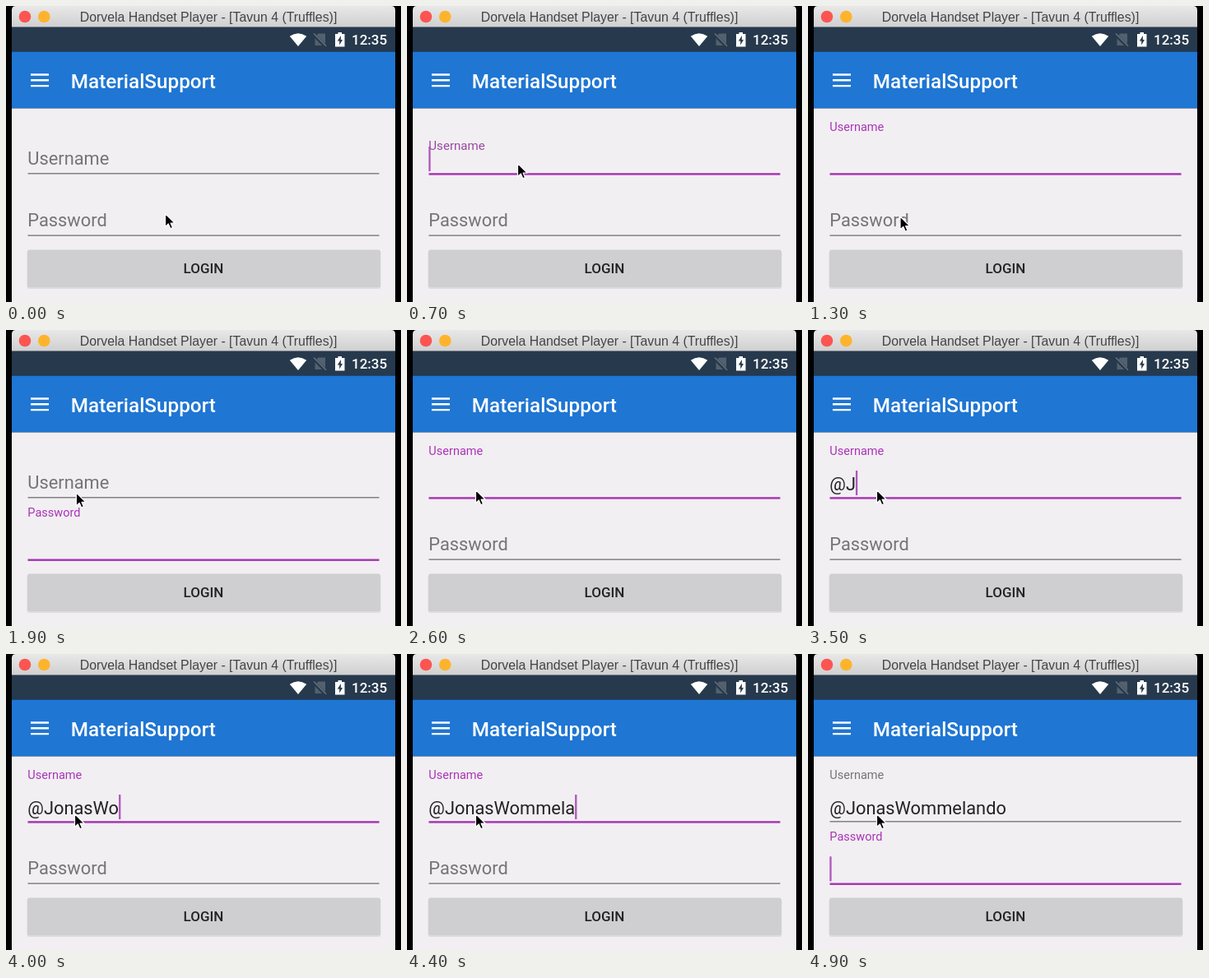
Animation, 480 px wide and 360 px high, one loop 5100 ms. Source, as an HTML page:

```html
<!DOCTYPE html>
<html lang="en">
<head>
<meta charset="utf-8">
<title>Floating labels</title>
<style>
  html, body { margin: 0; width: 100%; height: 100%; overflow: hidden; background: #000; }
  svg { display: block; width: 480px; height: 360px; }
  text { font-family: Roboto, sans-serif; white-space: pre; }
  .medium { font-weight: 500; }
  .bar { font: 15.85px "Liberation Sans", Arial, sans-serif; fill: #444; }
  .value { font-size: 21.84px; fill: #232225; }
  .caret { fill: #b155bd; }
</style>
</head>
<body>
<svg viewBox="0 0 480 360">
  <defs>
    <linearGradient id="chrome" x2="0" y2="1">
      <stop offset="0" stop-color="#e9e8e9"/>
      <stop offset="1" stop-color="#d0cfd0"/>
    </linearGradient>
  </defs>
  <rect width="480" height="360"/>
  <path d="M7 26V5Q7 0 12 0H468Q473 0 473 5V26Z" fill="url(#chrome)"/>
  <circle cx="23" cy="13" r="7.3" fill="#fc5551"/>
  <circle cx="46.3" cy="13" r="7.3" fill="#fdb42c"/>
  <text class="bar" x="246" y="19" text-anchor="middle">Dorvela Handset Player - [Tavun 4 (Truffles)]</text>

  <rect x="7" y="25.5" width="466" height="30" fill="#27394d"/>
  <path d="M355 49L344.8 36.8Q355 29.6 365.2 36.8Z" fill="#fff"/>
  <path d="M379.5 33.5H388V48H375.5V37.5Z" fill="#53616f"/>
  <path d="M373 34L389 50" stroke="#27394d" stroke-width="4"/>
  <path d="M374 33.5L389 48.8" stroke="#65717d" stroke-width="1.5"/>
  <path d="M400 34H403.5V32H408V34H411.5V49.5H400Z" fill="#fff"/>
  <path d="M407 36L402.8 42.6H405.2V47.5L409 41H406.8Z" fill="#27394d"/>
  <text class="medium" x="420" y="47.3" font-size="17" fill="#fff">12:35</text>

  <rect x="7" y="55.5" width="466" height="69" fill="#1f76d3"/>
  <path d="M30 83.5H52M30 90.3H52M30 97.1H52" stroke="#fff" stroke-width="2.4"/>
  <text class="medium" x="78.8" y="100" font-size="24.27" fill="#fff">MaterialSupport</text>

  <rect x="7" y="124.5" width="466" height="236" fill="#f1eff2"/>
  <g id="fields"></g>

  <rect x="25.5" y="298" width="430" height="46" rx="3" fill="#dddbde"/>
  <rect x="26" y="296.5" width="429" height="45.5" rx="2.5" fill="#cfced0"/>
  <text class="medium" x="240" y="325.3" font-size="17" text-anchor="middle" fill="#232225">LOGIN</text>

  <path id="pointer" d="M0 0V16L3.8 12.5L6.3 18.2L9 17L6.6 11.5H11.6Z" stroke="#fff" stroke-width="1.2" stroke-linejoin="round"/>
</svg>
<script>
const LOOP = 5100, STEP = 100, LAST = 4900;
const LEFT = 26.3, BIG = 21.84, SMALL = 14.56;
const GREY = [118, 116, 119], ACCENT = [170, 52, 182];
const NAME = "@JonasWommelando";

// Time and field index of each focus change
const FOCUS = [[566, 0], [1380, 1], [2090, 0], [4700, 1]];
// Pointer stops: time, x, y
const STOPS = [
  [100, 193.5, 252.5], [550, 134.5, 191.5], [800, 134.5, 191.5],
  [1250, 112, 256], [1450, 112, 256], [1850, 86, 199], [2000, 83.5, 194.5]
];

const clamp = v => Math.min(1, Math.max(0, v));
const mix = (a, b, k) => a + (b - a) * k;

function make(parent, tag, attrs) {
  const el = document.createElementNS("http://www.w3.org/2000/svg", tag);
  set(el, attrs);
  return parent.appendChild(el);
}

function set(el, attrs) {
  for (const key in attrs) el.setAttribute(key, attrs[key]);
}

// cubic-bezier(.4, 0, .2, 1)
function fastOutSlowIn(x) {
  let lo = 0, hi = 1;
  for (let i = 0; i < 20; i++) {
    const s = (lo + hi) / 2, r = 1 - s;
    if (1.2 * r * r * s + 0.6 * r * s * s + s * s * s < x) lo = s; else hi = s;
  }
  return lo * lo * (3 - 2 * lo);
}

const root = document.getElementById("fields");
const pointer = document.getElementById("pointer");
const fields = ["Username", "Password"].map((hint, i) => {
  const y = i * 75.3;
  const label = make(root, "text", { x: LEFT });
  label.textContent = hint;
  return {
    y, label,
    line: make(root, "rect", { x: 26.5, width: 427 }),
    value: make(root, "text", { class: "value", x: LEFT, y: 194.7 + y }),
    caret: make(root, "rect", { class: "caret", y: 171 + y, width: 2.3, height: 30 })
  };
});

function typedCount(t) {
  if (t < 3200) return 0;
  if (t < 3500) return 1;
  return Math.min(NAME.length, 2 + Math.floor((t - 3500) / 80));
}

// How far the label has risen, 0 to 1
function lift(index, t, filled) {
  if (filled) return 1;
  let f = 0;
  for (const [at, target] of FOCUS) {
    if (t < at) break;
    f = mix(f, target === index ? 1 : 0, clamp((t - at) / 200));
  }
  return f;
}

function drawField(field, index, t, focus) {
  const { y, label, line, value, caret } = field;
  const count = index ? 0 : typedCount(t);
  const focused = focus && focus[1] === index;
  const f = lift(index, t, count > 0);
  const color = GREY.map((c, i) => Math.round(mix(c, focused ? ACCENT[i] : c, f)));

  set(label, {
    y: mix(193, 152, f * f) + y,
    "font-size": mix(BIG, SMALL, fastOutSlowIn(f)),
    fill: `rgb(${color})`
  });
  set(line, focused
    ? { y: 203.2 + y, height: 2.4, fill: "#a632b2" }
    : { y: 203.2 + y, height: 1.2, fill: "#676568" });

  value.textContent = NAME.slice(0, count);
  const since = count ? 0 : t - (focus ? focus[0] : 0);
  const lit = focused && since % 1000 < 500;
  set(caret, {
    x: LEFT + (count ? value.getComputedTextLength() : 0),
    visibility: lit ? "visible" : "hidden"
  });
}

function drawPointer(t) {
  let [, x, y] = STOPS[0];
  for (let i = 1; i < STOPS.length; i++) {
    const [from] = STOPS[i - 1], [to, tx, ty] = STOPS[i];
    const k = clamp((t - from) / (to - from)), e = k * k * (3 - 2 * k);
    x = mix(x, tx, e);
    y = mix(y, ty, e);
  }
  set(pointer, { transform: `translate(${x} ${y})` });
}

function draw(ms) {
  const t = Math.min(LAST, Math.floor(ms % LOOP / STEP) * STEP);
  const focus = FOCUS.filter(([at]) => at <= t).pop();
  fields.forEach((field, i) => drawField(field, i, t, focus));
  drawPointer(t);
}

const start = performance.now();
function tick() {
  draw(performance.now() - start);
  requestAnimationFrame(tick);
}
tick();
</script>
</body>
</html>
```
